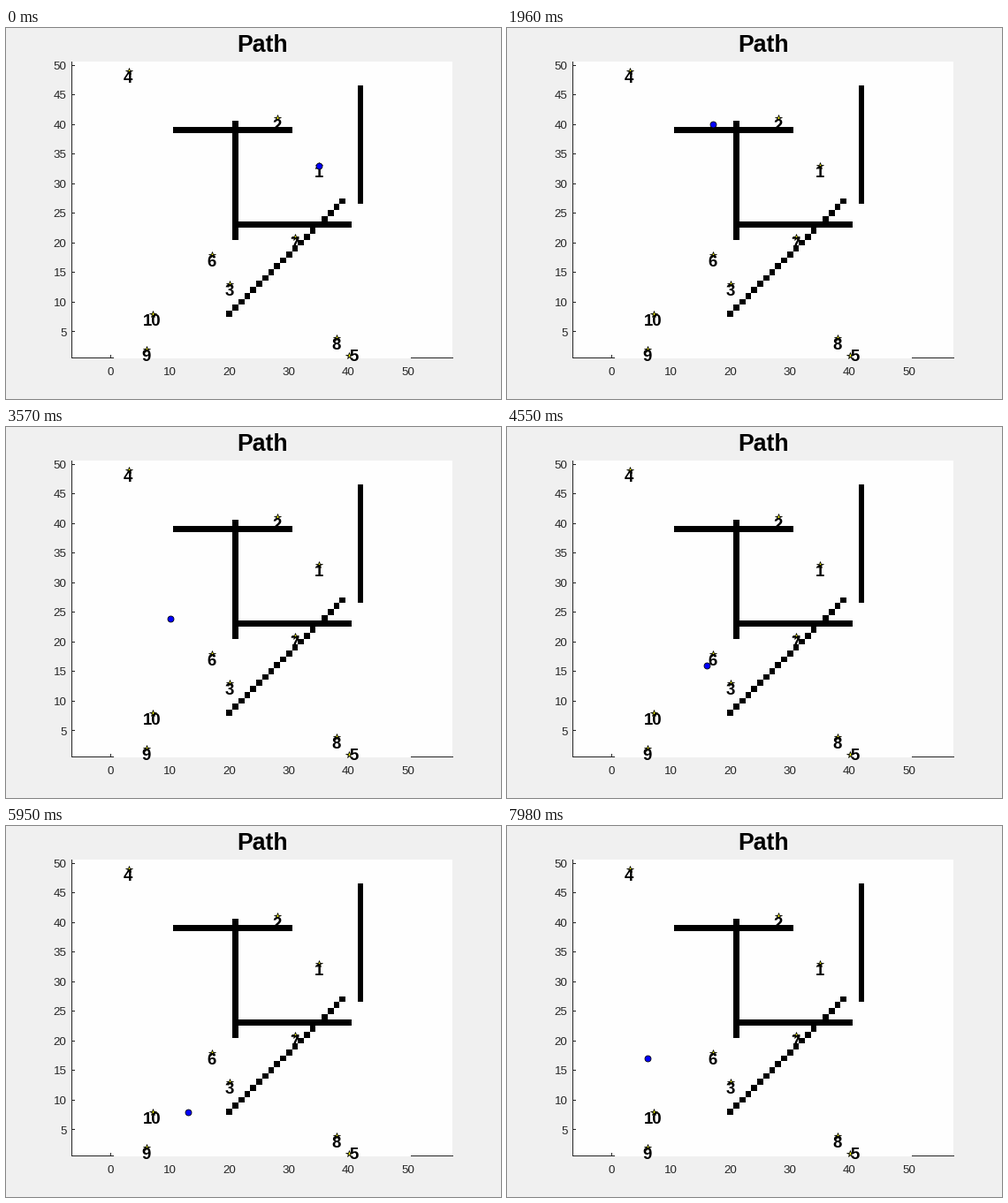
Recreate the animation shown at these times as a matplotlib script. Size 560 by 420 pixels, loop 8000 ms.

```python
import matplotlib.pyplot as plt
from matplotlib.animation import FuncAnimation
from matplotlib.patches import Rectangle

W, H, DPI = 560, 420, 100
PT = 72 / DPI  # points per pixel
LOOP, STEP, TICK = 8000, 70, 20  # ms
UX, UY = 6.73, 6.708  # pixels per grid cell
INK = "#262626"

CITIES = [(35, 33), (28, 41), (20, 13), (3, 49), (40, 1),
          (17, 18), (31, 21), (38, 4), (6, 2), (7, 8)]

# Each leg ends at a city, where the robot waits for one step.
LEGS = [
    [(31, 38), (31, 40), (28, 41)],
    [(20, 41), (20, 40), (10, 40), (20, 13)],
    [(6, 2)],
    [(3, 49)],
]


def px(x):
    return 118.75 + UX * x


def py(y):
    return 42.12 + UY * (50 - y)


def sign(v):
    return (v > 0) - (v < 0)


def walk(start, goal):
    """Grid moves that always shorten the longer remaining side."""
    x, y = start
    while (x, y) != goal:
        dx, dy = goal[0] - x, goal[1] - y
        if abs(dy) >= abs(dx):
            y += sign(dy)
        else:
            x += sign(dx)
        yield x, y


def build_route():
    route = [CITIES[0]]
    for leg in LEGS:
        for goal in leg:
            route.extend(walk(route[-1], goal))
        route.append(route[-1])
    return route


fig = plt.figure(figsize=(W / DPI, H / DPI), dpi=DPI, facecolor="#f0f0f0")
ax = fig.add_axes([0, 0, 1, 1])
ax.set_xlim(0, W)
ax.set_ylim(H, 0)
ax.axis("off")


def box(x0, y0, x1, y1, color):
    ax.add_patch(Rectangle((x0, y0), x1 - x0, y1 - y0, fc=color, lw=0,
                           antialiased=False, zorder=1))


def wall(x0, y0, x1, y1):
    box(int(px(x0 - 0.5)), int(py(y1 + 0.5)),
        int(px(x1 + 0.5)), int(py(y0 - 0.5)), "black")


def label(x, y, text, size, ha="center", weight="normal", color=INK):
    """Text whose capitals are centred on y."""
    ax.text(x, y + 0.344 * size, text, fontsize=size * PT, ha=ha,
            va="baseline", family="Liberation Sans", weight=weight,
            color=color, zorder=3)


def marks(shape, size, fill, zorder):
    """Empty marker series; centres go on whole pixels."""
    line, = ax.plot([], [], shape, ms=size * PT, mfc=fill, mec="black",
                    mew=0.8 * PT, zorder=zorder, snap=False)
    return line


def place(line, cells):
    line.set_data([round(px(x)) for x, _ in cells],
                  [round(py(y)) for _, y in cells])


# Plot area, axis lines and ticks; the map hides the middle of the x axis.
box(74, 38, 505, 374, "#fefefe")
box(74, 38, 75, 374, INK)
box(74, 373, 122, 374, INK)
box(458, 373, 506, 374, INK)
box(118, 370, 119, 374, INK)
for v in range(5, 51, 5):
    row = int(py(v))
    box(74, row, 78, row + 1, INK)
    label(68.5, py(v), str(v), 13.33, ha="right")
for v in range(0, 51, 10):
    label(px(v) - 0.7, 388.5, str(v), 13.33)
label(289.7, 18, "Path", 26.67, weight="bold", color="black")

# Obstacles
wall(11, 39, 30, 39)
wall(21, 21, 21, 40)
wall(21, 23, 40, 23)
wall(42, 27, 42, 46)
for i in range(20):
    wall(20 + i, 8 + i, 20 + i, 8 + i)

# Cities; the lowest one has its number beside it.
place(marks("*", 7.8, "yellow", 2), CITIES)
for n, (x, y) in enumerate(CITIES, 1):
    cell = (x, y - 1) if y > 1 else (x + 1, y)
    label(px(cell[0]) - 0.6, py(cell[1]), str(n), 18.67,
          weight="bold", color="black")

route = build_route()
robot = marks("o", 7, "blue", 4)


def draw(i):
    place(robot, [route[(i * TICK + TICK // 2) // STEP]])
    return robot,


anim = FuncAnimation(fig, draw, frames=LOOP // TICK, interval=TICK,
                     repeat=True, repeat_delay=0, blit=True)
plt.show()
```
